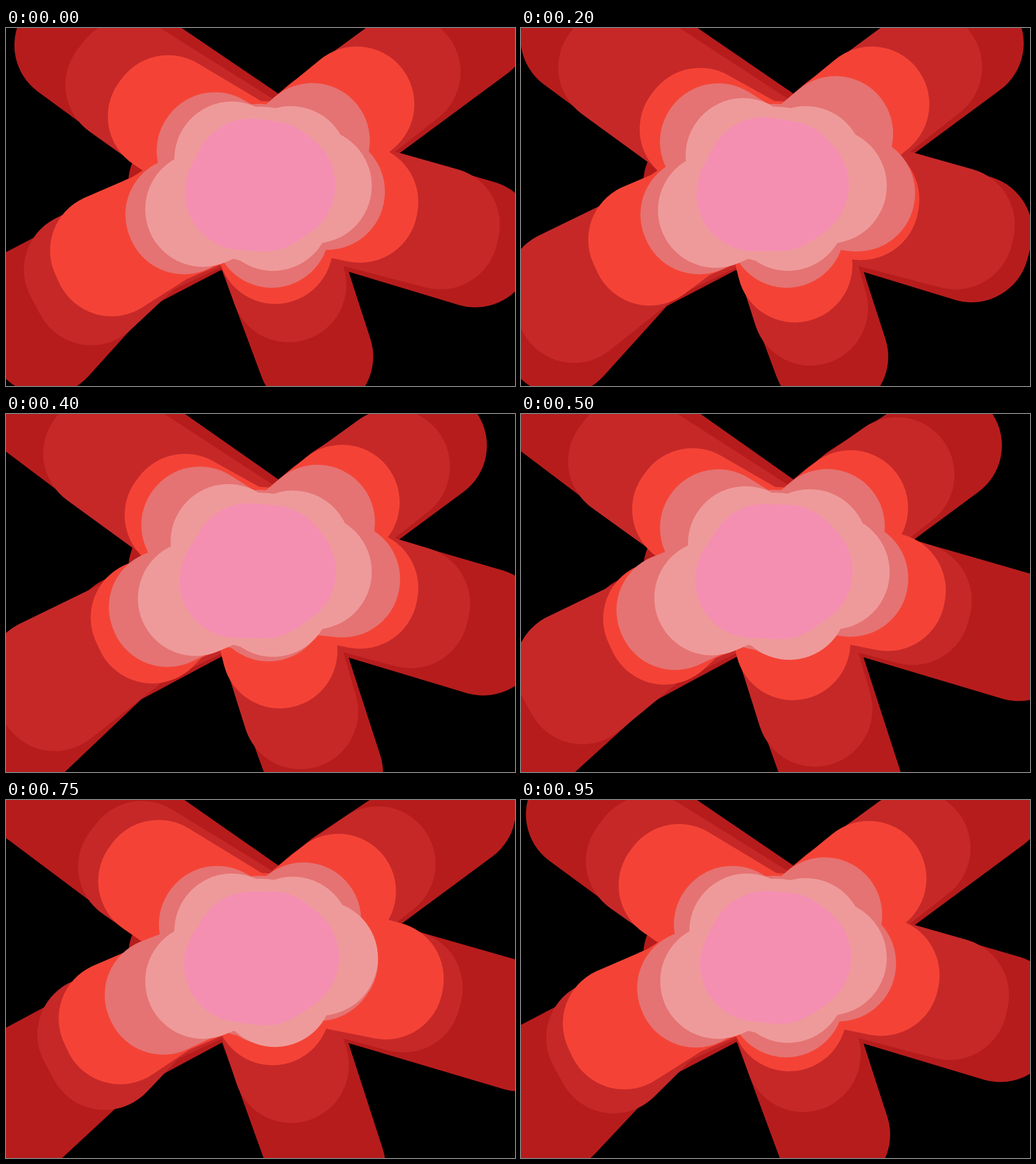
These frames come from a looping animation (892x628 px, 1 s). An HTML page with a canvas:

```html
<!DOCTYPE html>
<html lang="en">
<head>
<meta charset="utf-8">
<title>Blooming layers</title>
<style>
html, body { margin: 0; width: 100%; height: 100%; overflow: hidden; background: #000; }
canvas { display: block; }
</style>
</head>
<body>
<canvas id="stage" width="892" height="628"></canvas>
<script>
const ctx = document.getElementById('stage').getContext('2d');
const LOOP = 1000, STEP = 50, RADIUS = 101;
const CX = 445, CY = 275;

// Outermost layer first; the last one is the core.
const COLORS = ['#b71c1c', '#c62828', '#f44336', '#e57373', '#ef9a9a', '#f48fb1'];
const OUTER = COLORS.length - 2;

// Each arm bends through near, mid and far. Its layers swing in and out along
// it; peaks tell when in the loop each layer, from the inside, reaches furthest.
const ARMS = [
  { near: [396, 230], mid: [290, 158], far: [85, -15], sway: 11, flare: 1,
    root: [-15, -70], peaks: [.3, .35, .8, .3, .55] },
  { near: [499, 238], mid: [596, 149], far: [780, 27], sway: 10, flare: 0,
    peaks: [.57, .25, .1, .15, .95] },
  { near: [540, 277], mid: [632, 310], far: [850, 385], sway: 12, flare: .7,
    peaks: [.68, .3, .7, .1, .68] },
  { near: [468, 325], mid: [474, 392], far: [555, 615], sway: 10, flare: 0,
    peaks: [.65, .1, .3, .42, .6] },
  { near: [345, 318], mid: [215, 382], far: [5, 545], sway: 14, flare: 2,
    peaks: [.4, .6, .92, .32, .6] },
];

// Parabola through the three key points at u = 0, 0.5 and 1.
function along({ near, mid, far }, u) {
  const a = (1 - u) * (1 - 2 * u), b = 4 * u * (1 - u), c = u * (2 * u - 1);
  return [0, 1].map(k => a * near[k] + b * mid[k] + c * far[k]);
}

function armPoints(arm, depth, phase) {
  const u = depth / OUTER;
  const [rx, ry] = arm.root || [0, 0];
  const [x, y] = along(arm, u);
  const dist = Math.hypot(x - CX, y - CY);
  const dx = (x - CX) / dist, dy = (y - CY) / dist;
  const wave = Math.cos(2 * Math.PI * (phase - arm.peaks[depth]));
  const push = arm.sway * (depth + 1) * wave;
  const spread = arm.flare * depth * depth;
  const tip = side => [x + dx * push + dy * side, y + dy * push - dx * side];
  return [[CX + rx * u, CY + ry * u], along(arm, u / 2), tip(spread), tip(-spread)];
}

function corePoint(arm, phase) {
  const pull = .35 + .05 * Math.cos(2 * Math.PI * (phase - arm.peaks[0]));
  return [CX + (arm.near[0] - CX) * pull, CY + (arm.near[1] - CY) * pull];
}

function blob(points) {
  ctx.beginPath();
  points.forEach(p => ctx.lineTo(...p));
  ctx.closePath();
  ctx.fill();
  ctx.stroke();
}

function render(phase) {
  ctx.fillStyle = '#000';
  ctx.fillRect(0, 0, 892, 628);
  ctx.lineWidth = RADIUS * 2;
  ctx.lineCap = ctx.lineJoin = 'round';
  COLORS.forEach((color, i) => {
    const depth = OUTER - i;
    ctx.fillStyle = ctx.strokeStyle = color;
    ctx.beginPath();
    ctx.ellipse(CX, CY, 147 + 21 * depth, 137 + 5 * depth, 0, 0, 2 * Math.PI);
    if (depth < 0) {
      blob(ARMS.map(arm => corePoint(arm, phase)));
    } else {
      ctx.fill();
      ARMS.forEach(arm => blob(armPoints(arm, depth, phase)));
    }
  });
}

const start = performance.now();
function tick() {
  const elapsed = (performance.now() - start) % LOOP;
  render(Math.floor(elapsed / STEP) * STEP / LOOP);
  requestAnimationFrame(tick);
}
tick();
</script>
</body>
</html>
```
